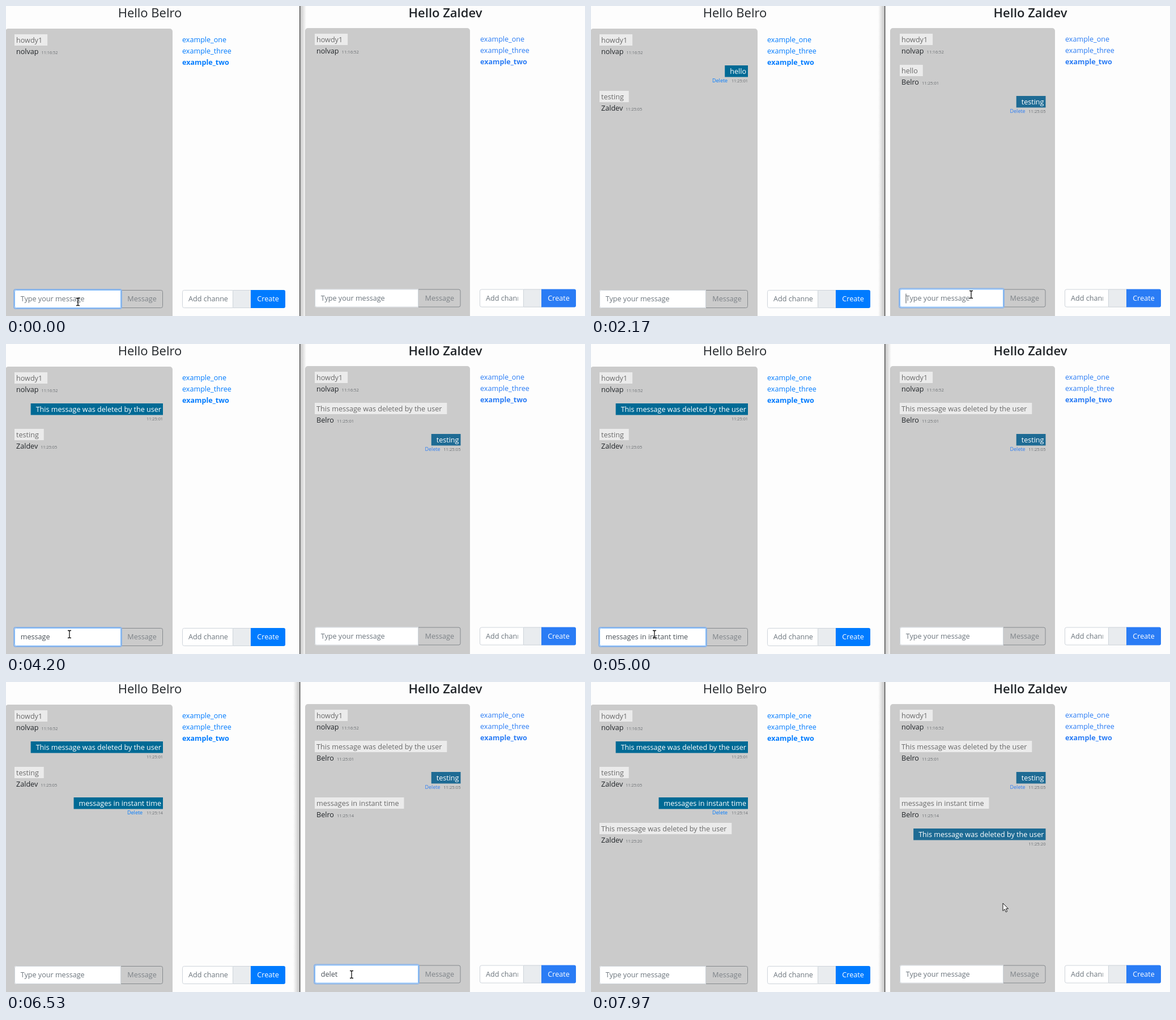
Animation of 1022 by 548 pixels, one loop 8010 ms. Source, as an HTML page with a canvas:

```html
<!DOCTYPE html>
<html lang="en">
<head>
<meta charset="utf-8">
<title>Two chat windows</title>
<style>
  html, body { margin: 0; width: 100%; height: 100%; overflow: hidden; background: #fdfdfd; }
  canvas { display: block; }
</style>
</head>
<body>
<canvas id="stage" width="1022" height="548"></canvas>
<script>
const ctx = document.getElementById('stage').getContext('2d');
const LOOP = 8010;
const SIZE = 12.6;
const DELETED = 'This message was deleted by the user';

const panes = [
  { me: 'Belro', heading: 254, weight: 400, panel: [-1, 40, 295], left: 15, right: 277, first: 49.6,
    input: [15, 502, 188], addX: 311, addWidth: 90, linkX: 311, linkY: 63.7, stamp: 7.3,
    blue: '#007bff', own: '#006a95', deleteWeight: 500 },
  { me: 'Zaldev', heading: 775.5, weight: 600, panel: [528, 39, 291], left: 545, right: 802.5, first: 49,
    input: [545, 500.5, 183], addX: 836, addWidth: 78, linkX: 837, linkY: 62.8, stamp: 7.65,
    blue: '#2a7cf5', own: '#1e6b94', deleteWeight: 400 }
];

// start and step drive the typing, sent and gone are moments in the loop
const messages = [
  { by: 'nolvap', text: 'howdy1', stamp: '11:16:52', sent: -1 },
  { by: 'Belro', text: 'hello', stamp: '11:25:01', start: 330, step: 45, sent: 690, gone: 2980 },
  { by: 'Zaldev', text: 'testing', stamp: '11:25:05', start: 1560, step: 50, sent: 2030 },
  { by: 'Belro', text: 'messages in instant time', stamp: '11:25:14', start: 3900, step: 47, sent: 5100 },
  { by: 'Zaldev', text: 'delete me', stamp: '11:25:20', start: 6400, step: 32, sent: 6950, gone: 7700 }
];

// time, focused input, active window
const focusChanges = [
  [-180, 0, 0], [1400, 1, 1], [2980, -1, 0], [3450, 0, 0], [5900, 1, 1], [7700, -1, 1]
];

// time, x, y
const pointerPath = [
  [0, 127, 523], [760, 127, 523], [1340, 671, 510], [2400, 671, 510], [2830, 228, 131],
  [2990, 228, 131], [3130, 183, 342], [3420, 112, 513], [5430, 112, 513], [5640, 610, 517],
  [7230, 610, 517], [7560, 752, 285], [7720, 752, 285], [7960, 727, 391], [LOOP, 727, 391]
];

function write(text, x, y, color, { size = SIZE, weight = 400, align = 'left' } = {}) {
  ctx.font = `${weight} ${size}px "Open Sans", "Noto Sans", sans-serif`;
  ctx.textAlign = align;
  ctx.fillStyle = color;
  ctx.fillText(text, x, y);
  return ctx.measureText(text).width;
}

function box(x, y, w, h, fill, border, radii = 0) {
  ctx.beginPath();
  ctx.roundRect(x, y, w, h, radii);
  if (fill) { ctx.fillStyle = fill; ctx.fill(); }
  if (border) {
    ctx.beginPath();
    ctx.roundRect(x + .5, y + .5, w - 1, h - 1, radii);
    ctx.lineWidth = 1;
    ctx.strokeStyle = border;
    ctx.stroke();
  }
}

function clipped(x, y, w, h, draw) {
  ctx.save();
  ctx.beginPath();
  ctx.rect(x, y, w, h);
  ctx.clip();
  draw();
  ctx.restore();
}

function drawMessages(pane, t, pointer) {
  let top = pane.first;
  for (const m of messages.filter(m => t >= m.sent)) {
    const y = Math.round(top);
    const gone = t >= m.gone;
    const text = gone ? DELETED : m.text;
    ctx.font = `${SIZE}px "Open Sans", "Noto Sans", sans-serif`;
    const width = ctx.measureText(text).width + 12;
    const stamp = { size: pane.stamp };
    if (m.by === pane.me) {
      box(pane.right - width, y, width, 20.5, pane.own);
      write(text, pane.right - 3, y + 14.7, '#fff', { align: 'right' });
      write(m.stamp, pane.right, y + 29.6, '#6a6e72', { ...stamp, align: 'right' });
      if (!gone) {
        const x = pane.right - 63;
        const w = write('Delete', x, y + 30.2, pane.blue, { size: 9, weight: pane.deleteWeight });
        if (overLink(pointer, x, y)) box(x, y + 31.2, w, .8, pane.blue);
      }
      top += 45;
    } else {
      box(pane.left, y, width, 20, '#ebebeb');
      write(text, pane.left + 3, y + 14.7, '#6a6a6a');
      const w = write(m.by, pane.left + 3, y + 35.2, '#212529');
      write(m.stamp, pane.left + w + 8, y + 35.2, '#6a6e72', stamp);
      top += 54.9;
    }
  }
}

const overLink = ([px, py], x, y) => px >= x && px <= x + 28 && py >= y + 22 && py <= y + 33;

function drawMessageForm(pane, t, focused, focusTime) {
  const [x, y, w] = pane.input;
  const end = x + w;
  box(end - 1, y, pane.right - end + 1, 32, null, '#85898d', [0, 3, 3, 0]);
  write('Message', (end + pane.right) / 2, y + 20.4, '#7d8287', { align: 'center' });
  if (focused) box(x - 2, y - 2, w + 4, 36, '#8db4e6', null, 4);
  box(x, y, w, 32, '#fff', focused ? '#80bdff' : '#ced4da', [3, 0, 0, 3]);

  const draft = messages.find(m => m.by === pane.me && t >= m.start && t < m.sent);
  if (draft) {
    const count = 1 + Math.floor((t - draft.start) / draft.step);
    write(draft.text.slice(0, count), x + 10.7, y + 20.2, '#495057');
    return;
  }
  write('Type your message', x + 10.7, y + 20.2, '#6c757d');
  const lastSent = Math.max(...messages.filter(m => m.by === pane.me && m.sent <= t).map(m => m.sent), focusTime);
  if (focused && (t - lastSent) % 360 < 180) box(x + 10.5, y + 8, 1, 17, '#495057');
}

function drawChannels(pane) {
  const names = ['example_one', 'example_three', 'example_two'];
  names.forEach((name, i) =>
    write(name, pane.linkX, pane.linkY + i * 20.2, pane.blue, { weight: i === 2 ? 700 : 400 }));

  const x = pane.addX, y = pane.input[1], w = pane.addWidth;
  box(x + w - 1, y, 33, 32, '#e9ecef', '#ced4da');
  box(x, y, w, 32, '#fff', '#ced4da', [3, 0, 0, 3]);
  clipped(x, y, w - 10, 32, () => write('Add channel', x + 11, y + 20.2, '#6c757d'));
  box(x + w + 31, y, 61, 32, pane.blue, null, [0, 3, 3, 0]);
  write('Create', x + w + 61.5, y + 20.2, '#fff', { align: 'center' });
}

function drawPane(pane, index, t, focus, pointer) {
  const [x, y, w] = pane.panel;
  write('Hello ' + pane.me, pane.heading, 20, '#212529', { size: 22, weight: pane.weight, align: 'center' });
  box(x, y, w, 560, '#cbcbcb', null, 5);
  drawMessages(pane, t, pointer);
  drawMessageForm(pane, t, focus[1] === index, focus[0]);
  drawChannels(pane);
}

function drawDivider(active) {
  const [from, to] = active ? [518, 507] : [519, 530];
  const shade = ctx.createLinearGradient(from, 0, to, 0);
  shade.addColorStop(0, 'rgba(0,0,0,.22)');
  shade.addColorStop(1, 'rgba(0,0,0,0)');
  ctx.fillStyle = shade;
  ctx.fillRect(Math.min(from, to), 0, 11, 548);
  box(518, 0, 1.4, 548, '#4a4a4a');
}

function pointerAt(t) {
  const i = pointerPath.findIndex(p => p[0] > t);
  const [t0, x0, y0] = pointerPath[i - 1], [t1, x1, y1] = pointerPath[i];
  const k = (t - t0) / (t1 - t0);
  const eased = k * k * (3 - 2 * k);
  return [x0 + (x1 - x0) * eased, y0 + (y1 - y0) * eased];
}

const arrow = new Path2D('M0 0V13.5L3.2 10.6L5.3 15.6L7.6 14.6L5.5 9.8H9.6Z');
const hand = new Path2D('M-1.2 1Q0-.8 1.2 1V5.5L6.5 7Q8 7.5 7.6 9.5L6.6 15H-.8L-4.6 9.4Q-4.6 7.4-2.8 8L-1.2 9.4Z');
const beam = new Path2D('M-3-6.5H-1L0-5.5L1-6.5H3M0-5.5V5.5M-3 6.5H-1L0 5.5L1 6.5H3');

function drawPointer([x, y]) {
  const overInput = panes.some(({ input: [left, top, w] }) =>
    x > left && x < left + w && y > top && y < top + 32);
  const onDelete = overLink([x, y], 214, 105) || overLink([x, y], 739.5, 259);
  ctx.save();
  ctx.translate(x, y);
  ctx.strokeStyle = '#111';
  ctx.lineWidth = overInput ? 1.3 : 1;
  if (overInput) {
    ctx.stroke(beam);
  } else {
    const shape = onDelete ? hand : arrow;
    ctx.fillStyle = '#fff';
    ctx.fill(shape);
    ctx.stroke(shape);
  }
  ctx.restore();
}

function frame() {
  const t = performance.now() % LOOP;
  const focus = focusChanges.filter(f => f[0] <= t).pop();
  const pointer = pointerAt(t);
  box(0, 0, 1022, 548, '#fdfdfd');
  panes.forEach((pane, i) => drawPane(pane, i, t, focus, pointer));
  drawDivider(focus[2]);
  drawPointer(pointer);
  requestAnimationFrame(frame);
}
frame();
</script>
</body>
</html>
```
